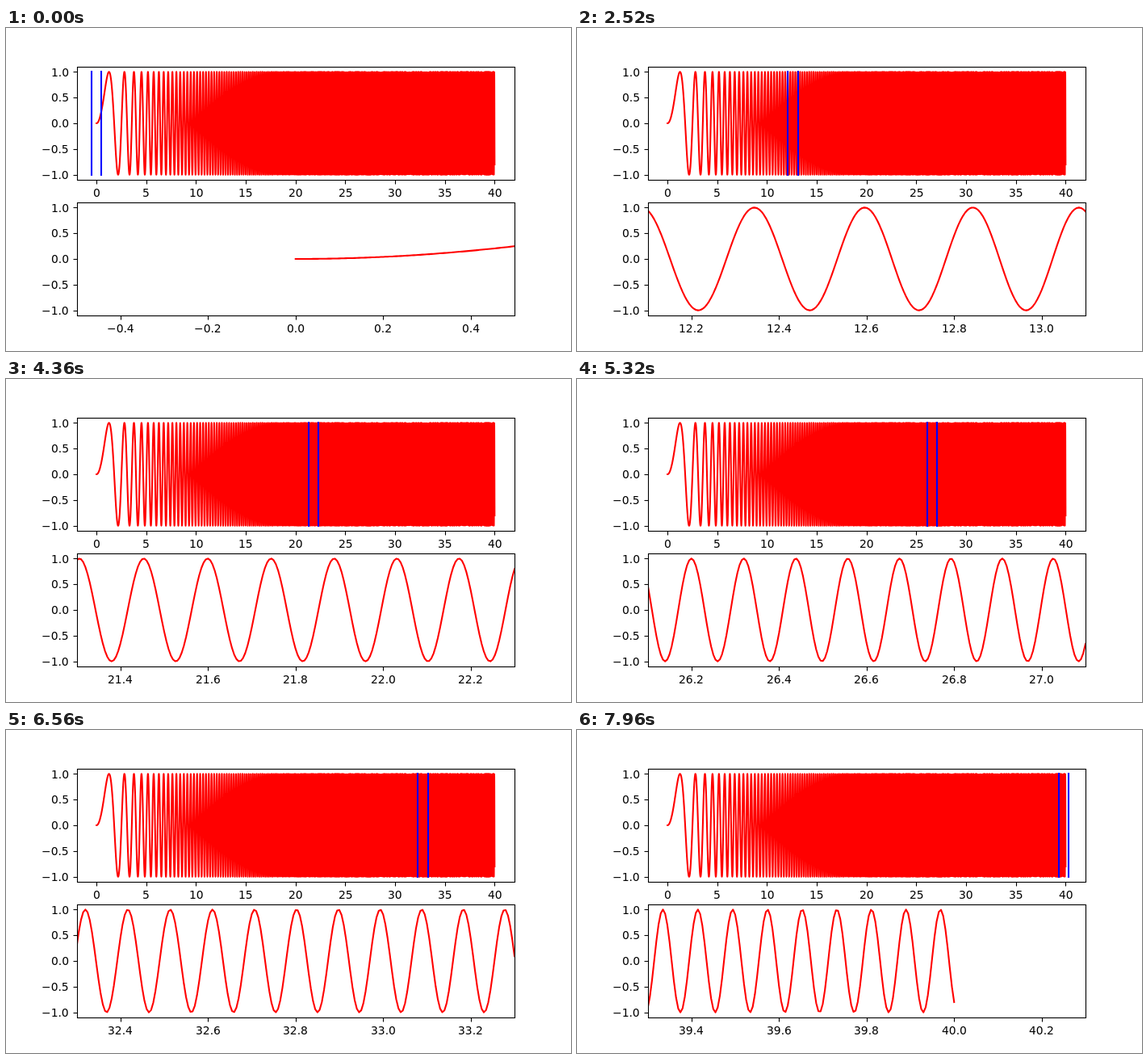
Recreate the animation shown at these times as an HTML page with a canvas. Size 700x400 px, loop 8 s.

```html
<!DOCTYPE html>
<html>
<head>
<meta charset="utf-8">
<style>
  html, body { margin: 0; width: 100%; height: 100%; overflow: hidden; background: #fff; }
  canvas { display: block; }
</style>
</head>
<body>
<canvas id="stage" width="700" height="400"></canvas>
<script>
const LEFT = 87.5, WIDTH = 542.5, HEIGHT = 140;
const TOP = 48, BOTTOM = 216;          // upper edges of the two plots
const STEP = 0.005, END = 40;          // sampling of sin(x²)
const FRAME_MS = 40, FRAMES = 200;

const stage = document.getElementById('stage');
const ctx = stage.getContext('2d');

const toX = (x, min, max) => LEFT + (x - min) / (max - min) * WIDTH;
const toY = (y, top) => top + HEIGHT / 2 - y * HEIGHT / 2.2;
const overviewX = x => toX(x, -2, 42);

function line(c, x1, y1, x2, y2) {
  c.beginPath();
  c.moveTo(x1, y1);
  c.lineTo(x2, y2);
  c.stroke();
}

function curve(c, from, to, top, mapX) {
  const first = Math.max(0, Math.floor(from / STEP));
  const last = Math.min(Math.round(END / STEP), Math.ceil(to / STEP));
  c.save();
  c.beginPath();
  c.rect(88, top, 542, HEIGHT);
  c.clip();
  c.beginPath();
  for (let i = first; i <= last; i++) {
    const x = i * STEP;
    c.lineTo(mapX(x), toY(Math.sin(x * x), top));
  }
  c.strokeStyle = '#f00';
  c.lineWidth = 2.083;
  c.lineJoin = 'round';
  c.lineCap = 'square';
  c.stroke();
  c.restore();
}

// align: 0.5 centres the text on x, 1 ends it there
function label(c, text, x, y, align) {
  text = text.replace('-', '\u2212');
  c.fillText(text, Math.round(x - c.measureText(text).width * align), Math.round(y));
}

function axes(c, top, ticks, mapX, digits) {
  c.strokeStyle = c.fillStyle = '#000';
  c.lineWidth = 1.111;
  c.font = '13.889px "DejaVu Sans", sans-serif';
  c.strokeRect(88.5, top + 0.5, 542, HEIGHT);
  const base = top + HEIGHT;
  for (const v of ticks) {
    const x = Math.round(mapX(v)) + 0.5;
    line(c, x, base + 0.5, x, base + 5.5);
    label(c, v.toFixed(digits), mapX(v), base + 21, 0.5);
  }
  for (let v = -1; v <= 1; v += 0.5) {
    const y = Math.round(toY(v, top)) + 0.5;
    line(c, 83.5, y, 88.5, y);
    label(c, v.toFixed(1), 77.78, toY(v, top) + 5.2, 1);
  }
}

// The overview never changes, so it is drawn once.
const overview = document.createElement('canvas');
overview.width = 700;
overview.height = 400;
const octx = overview.getContext('2d');
octx.fillStyle = '#fff';
octx.fillRect(0, 0, 700, 400);
curve(octx, 0, END, TOP, overviewX);
axes(octx, TOP, [0, 5, 10, 15, 20, 25, 30, 35, 40], overviewX, 0);

function draw(frame) {
  const centre = frame / 5, min = centre - 0.5, max = centre + 0.5;
  const detailX = x => toX(x, min, max);
  ctx.drawImage(overview, 0, 0);

  ctx.strokeStyle = '#00f';
  ctx.lineWidth = 2.083;
  for (const edge of [min, max]) {
    const x = Math.round(overviewX(edge));
    line(ctx, x, 52.96, x, 183.04);
  }

  curve(ctx, min, max, BOTTOM, detailX);
  axes(ctx, BOTTOM, [-2, -1, 0, 1, 2].map(i => (frame + i) / 5), detailX, 1);
}

const start = performance.now();
function tick() {
  draw(Math.floor((performance.now() - start) / FRAME_MS) % FRAMES);
  requestAnimationFrame(tick);
}
tick();
</script>
</body>
</html>
```
